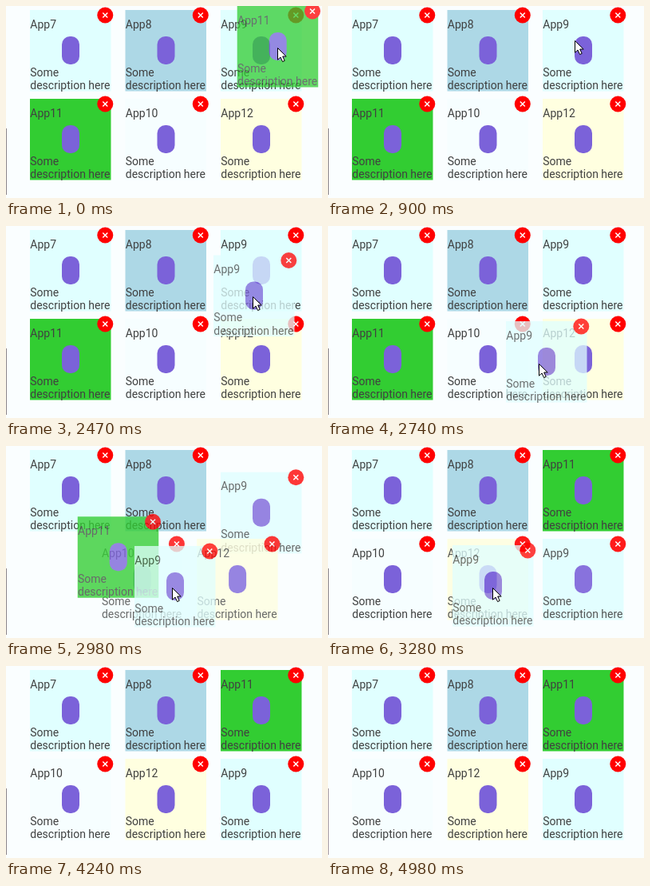
An HTML page for the animation above (5.08 s loop, 396 by 240 pixels).

```html
<!DOCTYPE html>
<html lang="en">
<head>
<meta charset="utf-8">
<title>Drag to reorder</title>
<style>
  html, body { margin: 0; width: 100%; height: 100%; overflow: hidden; background: #fafeff; }
  svg { display: block; width: 396px; height: 240px; }
  text { font: 14px Roboto, sans-serif; fill: #404040; }
</style>
</head>
<body>
<svg id="stage" viewBox="0 0 396 240" xmlns="http://www.w3.org/2000/svg">
  <rect width="396" height="240" fill="#fafeff"/>
  <rect id="edge" y="153" width="1" height="83"/>
  <g id="tiles"></g>
  <g id="ghosts"></g>
  <path id="cursor" d="M.5 .5V15.2L4 12L6.6 17.6L9.2 16.4L6.7 11H11.2Z"
        fill="#fff" stroke="#000" stroke-linejoin="round"/>
</svg>
<script>
const LOOP = 5080;
const TICKS = [0, 460, 750, 900, 2200, 2350, 2470, 2620, 2740, 2860, 2980,
  3130, 3280, 3430, 3550, 3840, 3960, 4090, 4240, 4980];
const COLORS = { 7: '#e0ffff', 8: '#add8e6', 9: '#e0ffff', 10: '#f6feff', 11: '#32cd32', 12: '#ffffe0' };

// Slots before and after the drop, and progress at 3130 ms
const ITEMS = [
  { id: 7, from: 0, to: 0 },
  { id: 8, from: 1, to: 1 },
  { id: 10, from: 4, to: 3, late: 1 },
  { id: 11, from: 3, to: 2, late: 1 },
  { id: 9, from: 2, to: 5, late: .43 },
  { id: 12, from: 5, to: 4, late: .85 }
];

// [time, x, y]
const DRAG = [[2200, 259, -2], [2350, 262, 8], [2470, 260, 36.5], [2620, 243, 85],
  [2740, 223, 119], [2860, 190, 123], [2980, 161, 125], [3130, 156, 124]];
const POINTER = [[460, 340, 52], [750, 311, 45], [900, 309, 43], [2200, 310, 49],
  [2350, 313, 59], [2470, 309, 88], [2620, 288, 137], [2740, 264, 172], [2860, 236, 175],
  [2980, 208, 177], [3130, 206, 177], [3840, 206, 177], [3960, 262, 212], [4090, 304, 238]];

const $ = id => document.getElementById(id);
const lerp = (a, b, p) => a + (b - a) * p;
const slot = i => [30 + i % 3 * 119.5, i < 3 ? 5 : 116];

function along(keys, t) {
  if (t <= keys[0][0]) return keys[0].slice(1);
  for (let i = 1; i < keys.length; i++) {
    const a = keys[i - 1], b = keys[i];
    if (t <= b[0]) {
      const p = (t - a[0]) / (b[0] - a[0]);
      return a.slice(1).map((v, k) => lerp(v, b[k + 1], p));
    }
  }
  return keys[keys.length - 1].slice(1);
}

function makeTile(id, parent) {
  const g = document.createElementNS('http://www.w3.org/2000/svg', 'g');
  g.innerHTML = `
    <rect width="101.5" height="101.5" fill="${COLORS[id]}"/>
    <rect x="40" y="33" width="22" height="35" rx="10" fill="#7b62d9"/>
    <text x=".3" y="22.5">App${id}</text>
    <text x=".3" y="82.5">Some</text>
    <text x=".3" y="99">description here</text>
    <circle cx="94.3" cy="6.5" r="10" fill="#f00"/>
    <path d="M91.3 3.5l6 6m0-6l-6 6" stroke="#fff" stroke-width="1.5"/>`;
  parent.append(g);
  return g;
}

function place(node, [x, y], opacity = 1) {
  node.setAttribute('transform', `translate(${x} ${y})`);
  node.setAttribute('opacity', opacity);
}

for (const item of ITEMS) item.node = makeTile(item.id, $('tiles'));
const ghost11 = makeTile(11, $('ghosts'));
const ghost9 = makeTile(9, $('ghosts'));

function render(time) {
  const t = TICKS.filter(k => k <= time).pop();

  for (const { node, from, to, late } of ITEMS) {
    const a = slot(from), b = slot(to);
    if (from === to) { place(node, a); continue; }
    const [p] = along([[2860, 0], [2980, .25], [3130, late], [3280, 1]], t);
    const settle = late === 1 ? 3130 : 3550;
    const [alpha] = along([[2860, 1], [2980, .78], [settle, 1]], t);
    place(node, [lerp(a[0], b[0], p), lerp(a[1], b[1], p)], alpha);
  }

  place(ghost11, [289.7, 0], t < 460 ? .75 : 0);
  place(ghost9, along(DRAG, t), t >= 2200 && t < 3960 ? .75 : 0);
  place($('cursor'), along(POINTER, t), t < 4240 ? 1 : 0);
  $('edge').setAttribute('fill', t < 4980 ? '#8c868a' : '#a79ca4');
}

function frame(now) {
  render(now % LOOP);
  requestAnimationFrame(frame);
}
render(0);
requestAnimationFrame(frame);
</script>
</body>
</html>
```
